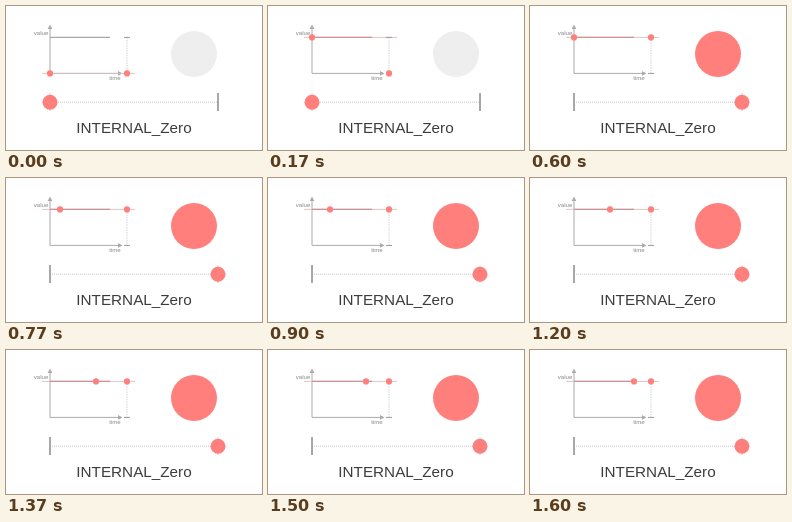
Write an HTML page with a canvas that moves like this. It is 256 by 144 pixels and loops after 2910 ms.

```html
<!DOCTYPE html>
<html lang="en">
<head>
<meta charset="utf-8">
<title>Interpolator preview</title>
<style>
html, body { margin: 0; width: 100%; height: 100%; overflow: hidden; background: #fff; }
canvas { display: block; width: 256px; height: 144px; }
</style>
</head>
<body>
<canvas id="stage" width="256" height="144"></canvas>
<script>
const canvas = document.getElementById('stage');
const ctx = canvas.getContext('2d');
const scale = window.devicePixelRatio || 1;
canvas.width = 256 * scale;
canvas.height = 144 * scale;

const LOOP = 2910, RISE = 130, TOP = 170, RUN = 600;
const RED = '#ff7f7c', GREY = '#aaa', LIGHT = '#c8c8c8';
const left = 44, end = 104, low = 67.4, high = 31.4, endX = 121;
const track = { y: 96.2, from: 44, to: 212 };

function line(x1, y1, x2, y2, color, width = 1, dash = []) {
  ctx.strokeStyle = color;
  ctx.lineWidth = width;
  ctx.setLineDash(dash);
  ctx.beginPath();
  ctx.moveTo(x1, y1);
  ctx.lineTo(x2, y2);
  ctx.stroke();
}

function disc(x, y, r, color) {
  ctx.fillStyle = color;
  ctx.beginPath();
  ctx.arc(x, y, r, 0, Math.PI * 2);
  ctx.fill();
}

function triangle(x1, y1, x2, y2, x3, y3) {
  ctx.fillStyle = GREY;
  ctx.beginPath();
  ctx.moveTo(x1, y1);
  ctx.lineTo(x2, y2);
  ctx.lineTo(x3, y3);
  ctx.fill();
}

function label(text, x, y, size, color) {
  ctx.font = size + 'px "Liberation Sans", Arial, sans-serif';
  ctx.textAlign = 'center';
  ctx.fillStyle = color;
  ctx.fillText(text, x, y);
}

function drawGraph(x, y, on) {
  line(left, 21, left, low, GREY);
  line(left, low, 114, low, GREY);
  triangle(left, 18.5, left - 2.3, 23, left + 2.3, 23);
  triangle(116.5, low, 112, low - 2.3, 112, low + 2.3);
  label('value', 35, 28.8, 6.1, '#888');
  label('time', 109, 74, 6.1, '#888');

  line(endX, high, endX, low, LIGHT, 0.8, [1.5, 1]);
  line(left, high, end, high, '#a8a8a8', 1.4);
  line(36, y, 129, y, '#d8c0c0', 0.9);
  if (y === high) line(left, y, end, y, 'rgba(220,90,100,.5)', 1);

  const spare = on ? low : high;
  line(endX - 3, spare, endX + 3, spare, '#999');
  disc(endX, on ? high : low, 3.1, RED);
  disc(x, y, 3.1, RED);
}

function drawTrack(on) {
  const { y, from, to } = track;
  line(from, y, to, y, LIGHT, 1, [1, 1]);
  for (const x of [from, to]) line(x, 87.5, x, 105, LIGHT, 1);
  const bar = on ? from : to;
  line(bar, 87, bar, 105, '#999', 1.6);
  disc(on ? to : from, y, 7.5, RED);
}

function draw(t) {
  const on = t >= RUN;
  // The marker runs 60 px in one second, at 30 steps per second.
  const step = on ? Math.min(30, Math.floor((t - RUN) * 0.03 + 0.101)) : 0;
  const y = t < RISE ? low : t < TOP ? (low + high) / 2 : high;

  ctx.setTransform(scale, 0, 0, scale, 0, 0);
  ctx.fillStyle = '#fff';
  ctx.fillRect(0, 0, 256, 144);
  drawGraph(left + step * 2, y, on);
  disc(188, 48, 23, on ? RED : '#eee');
  drawTrack(on);
  label('INTERNAL_Zero', 128, 127.4, 15.25, '#3c3c3c');
}

const start = performance.now();
function tick() {
  draw((performance.now() - start) % LOOP);
  requestAnimationFrame(tick);
}
tick();
</script>
</body>
</html>
```
